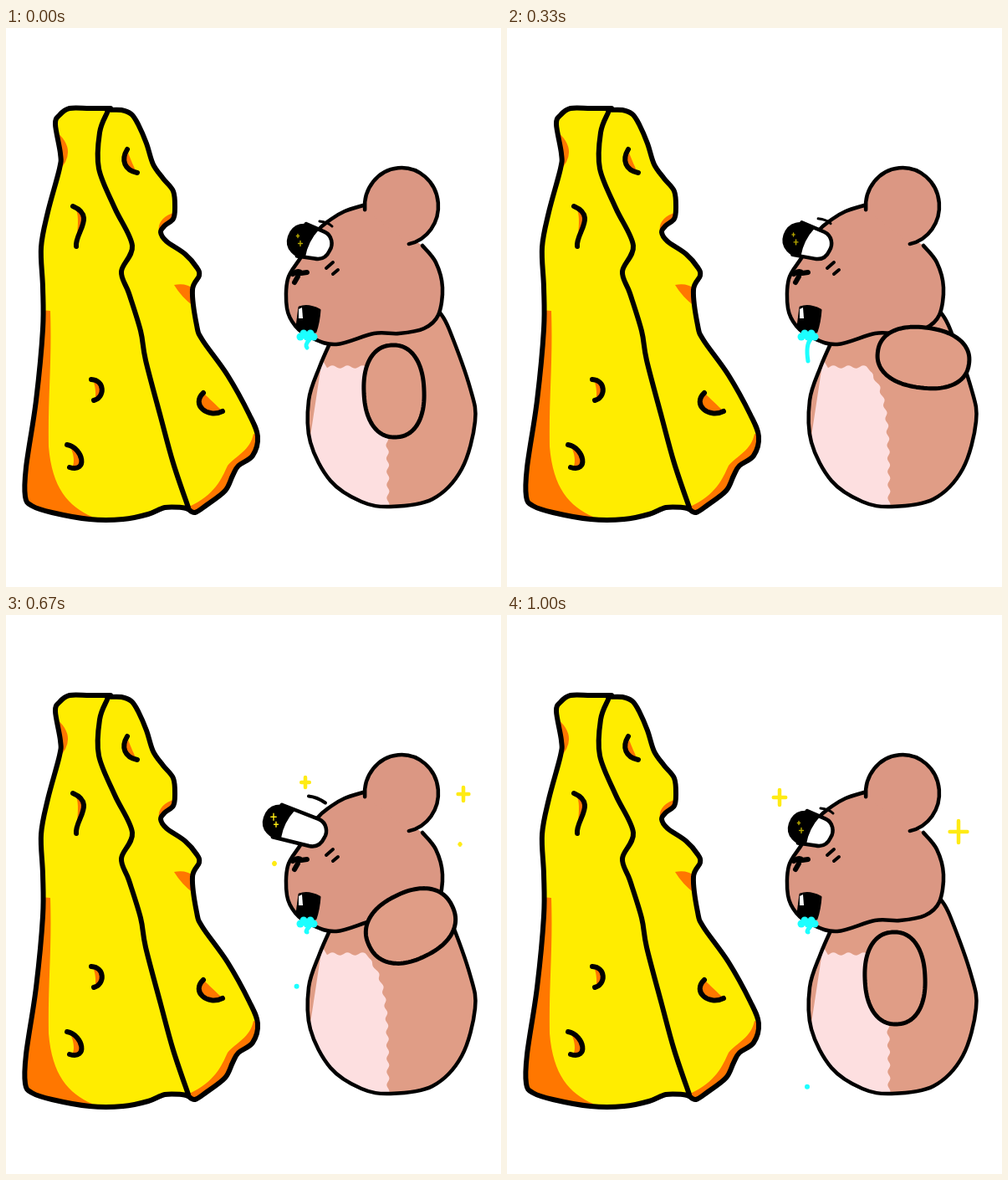
Animation, 592 px wide and 668 px high, one loop 1.08 s. Source, as an HTML page with a canvas:

```html
<!DOCTYPE html>
<html lang="en">
<head>
<meta charset="utf-8">
<title>Hungry bear</title>
<style>
html, body { margin: 0; width: 592px; height: 668px; overflow: hidden; background: #fff; }
canvas { display: block; }
</style>
</head>
<body>
<canvas id="stage" width="592" height="668"></canvas>
<script>
const ctx = document.getElementById('stage').getContext('2d');
const LOOP = 1080, FPS = 24;
const INK = '#000', CHEESE = '#ffed00', ORANGE = '#ff7700';
const BODY = '#e09d86', HEAD = '#db9783', BELLY = '#fddfe0', DROOL = '#1cffff', GOLD = '#ffeb14';

// Smooth curve through points given as "x,y x,y ..."
function curve(text, closed) {
  const p = text.split(' ').map(s => s.split(',').map(Number));
  const n = p.length;
  const at = i => closed ? p[(i + n) % n] : p[Math.max(0, Math.min(n - 1, i))];
  const path = new Path2D();
  path.moveTo(...p[0]);
  for (let i = 0; i < (closed ? n : n - 1); i++) {
    const [a, b, c, d] = [at(i - 1), at(i), at(i + 1), at(i + 2)];
    path.bezierCurveTo(b[0] + (c[0] - a[0]) / 6, b[1] + (c[1] - a[1]) / 6,
      c[0] - (d[0] - b[0]) / 6, c[1] - (d[1] - b[1]) / 6, ...c);
  }
  return path;
}
const svg = d => new Path2D(d);

function fill(path, color) {
  ctx.fillStyle = color;
  ctx.fill(path);
}
function line(path, width, color = INK) {
  ctx.strokeStyle = color;
  ctx.lineWidth = width;
  ctx.stroke(path);
}
function dot(x, y, r, color) {
  const path = new Path2D();
  path.arc(x, y, r, 0, Math.PI * 2);
  fill(path, color);
}
function plus(x, y, r, width, color = GOLD) {
  line(svg(`M${x - r * .8},${y}h${r * 1.6}M${x},${y - r}v${r * 2}`), width, color);
}
function clipped(path, paint) {
  ctx.save();
  ctx.clip(path);
  paint();
  ctx.restore();
}

// Cheese
const leftEdge = '125,96 100,96 76,96 64,104 59,115 65,150 64,168 50,220 42,262 44,310 44,360 36,445 24,525 23,560 31,571 55,579 100,587 140,587 170,581 190,573 210,573 218,575';
const rightEdge = '218,575 226,579 240,570 262,553 271,535 278,523 295,511 301,488 291,462 265,415 235,373 228,355 223,313 231,296 228,286 214,270 192,255 185,244 190,236 200,228 202,215 200,195 188,180 176,163 168,138 158,115 150,103 138,98 121,98';
const block = curve(leftEdge + ' ' + rightEdge, true);
const edges = [leftEdge, rightEdge,
  '121,101 112,125 111,168 130,215 151,260 138,291 147,317 161,362 167,397 185,465 200,520 218,573'
].map(s => curve(s));
const shade = svg(`M20,335L53,338C55,400 50,440 51,500C55,550 75,572 103,584L20,600Z
  M219,572C250,558 258,538 265,523C275,511 292,505 296,485L310,490V600H219Z
  M58,122Q88,146 62,172Z M203,220C185,225 180,236 184,246L205,236Z
  M201,307Q215,304 225,312V333Q210,322 201,307Z`);

// A hole is a bent stroke; depth tells how far its shadow reaches to the chord
function hole(a, b, c, d, depth) {
  const mix = (p, q) => p.map((v, i) => v + (q[i] - v) * depth);
  fill(svg(`M${a}C${b} ${c} ${d}C${mix(c, d)} ${mix(b, a)} ${a}`), ORANGE);
  line(svg(`M${a}C${b} ${c} ${d}`), 6);
}

function drawCheese() {
  fill(block, CHEESE);
  clipped(block, () => fill(shade, ORANGE));
  edges.forEach(e => line(e, 6));
  hole([145, 145], [137, 158], [142, 170], [157, 173], .9);
  hole([80, 213], [108, 225], [82, 245], [84, 261], .6);
  hole([102, 420], [118, 421], [119, 441], [105, 445], .7);
  hole([73, 498], [93, 502], [98, 532], [76, 525], .6);
  hole([236, 436], [221, 450], [241, 467], [259, 458], 1);
}

// Bear
const body = curve('389,373 375,405 362,445 364,495 388,541 425,566 460,572 510,563 545,527 561,470 555,430 530,360 519,340');
const head = curve('427,212 405,219 388,229 372,243 352,275 337,300 336,335 346,356 365,370 395,378 440,365 470,365 500,359 517,343 522,310 514,280 498,260');
const ear = new Path2D();
ear.ellipse(473, 213, 44, 46, 0, 3.05, 1.37 + Math.PI * 2);

// Frayed edges of the belly patch
const belly = new Path2D('M350,580');
belly.lineTo(378, 396);
for (let x = 384; x < 432; x += 2) belly.lineTo(x, 405 + 1.8 * Math.sin(x * .35));
for (let y = 410; y < 580; y += 2) {
  belly.lineTo(457 - 22 * Math.exp((412 - y) / 28) + 1.6 * Math.sin(y * .4), y);
}

function drawBear() {
  fill(body, BODY);
  clipped(body, () => fill(belly, BELLY));
  line(body, 4.5);
  fill(head, HEAD);
  line(head, 4.5);
  fill(ear, HEAD);
  line(ear, 4.5);

  line(svg('M343,294Q350,289 353,293L360,292M345,304L349,297'), 6);
  line(svg('M383,287L391,280M391,294L397,289'), 4);
  const mouth = svg('M351,334Q361,330 375,337Q374,352 370,363Q357,366 348,357Z');
  fill(mouth, INK);
  line(mouth, 3);
  fill(svg('M350,336L354,334L355,347H350Z'), '#fff');
}

// The eye pops out over three drawings, a little differently each time
function drawEye(k) {
  const reach = [21, 17, 29, 24, 0][Math.floor(k / 3)];
  const out = reach * Math.pow(k % 3 / 2, 1.4);
  const far = k % 3 === 2;
  const x = 354 - out, y = 254.5 - out * .25;
  const len = 35 + out * .82;

  ctx.save();
  ctx.translate(x, y);
  ctx.rotate(.33);
  const tube = svg(`M-2,-21L${len - 13},-19C${len - 3},-18 ${len + 2},-8 ${len},0C${len - 1},10 ${len - 6},14 ${len - 14},15L0,19Z`);
  const pupil = svg('M14,-20Q6,-2 9,17C0,22 -17,16 -17,0C-17,-16 -4,-24 14,-20Z');
  fill(tube, '#fff');
  line(tube, 4.5);
  fill(pupil, INK);
  line(pupil, 2);
  ctx.restore();

  const glint = far ? GOLD : '#b5a600';
  plus(x - 5, y - 6, far ? 4 : 2, 1.4, glint);
  plus(x - 2, y + 3, 3, 1.4, glint);

  const lx = 375 - out * .45, ly = 231 - out * .5;
  line(svg(`M${lx},${ly}q10,1 ${far ? '20,8' : '15,6'}`), far ? 4 : 3);
}

// A strand grows, lets go, and the drop falls in a slow sway
function drawDrool(k) {
  for (let i = 0; i < 5; i++) dot(352 + i * 4, 367 + (i % 2 ? -1 : 1) * 2, 4.5, DROOL);
  const loose = k - 5;
  const tip = loose < 0 ? 384 + k * 4 : 381;
  line(svg(`M363,372Q357,379 360,${tip - 2}`), 5, DROOL);
  if (loose >= 0) {
    dot(353 + 6 * Math.cos(loose / 7 * Math.PI * 2), 400 + 8 * loose + 2.2 * loose ** 2, 3, DROOL);
  }
}

// Arm: a slightly squared oval, turned about its middle
const poses = {
  down: { x: 464, y: 434, turn: 1.53, w: 36 },
  mid: { x: 498, y: 394, turn: .13, w: 36 },
  up: { x: 484, y: 371.5, turn: -.45, w: 40 }
};
function drawArm(n) {
  const beat = Math.floor(n / 3);
  const pose = poses[beat % 8 === 0 ? 'down' : beat % 2 ? 'up' : 'mid'];
  const squared = v => Math.sign(v) * Math.abs(v) ** .88;
  const path = new Path2D();
  for (let a = 0; a < Math.PI * 2; a += .06) {
    path.lineTo(55 * squared(Math.cos(a)), pose.w * squared(Math.sin(a)));
  }
  path.closePath();
  ctx.save();
  ctx.translate(pose.x, pose.y);
  ctx.rotate(pose.turn);
  fill(path, BODY);
  line(path, 5);
  ctx.restore();
}

// Sparkles: step of full size, x, y, size; one step later only a speck is left
const sparkles = [
  [6, 554, 255, 3], [7, 543, 274, 6], [8, 358, 200, 6], [8, 547, 214, 8], [8, 321, 297, 1],
  [10, 377, 206, 8], [10, 560, 316, 9], [12, 326, 218, 9], [12, 540, 259, 13]
];
function drawSparkles(k) {
  for (const [peak, x, y, size] of sparkles) {
    if (k === peak) plus(x, y, size, 4.5);
    if (k === peak + 1) plus(x, y, 1, 4);
  }
}

function draw(t) {
  // Drawing starts are rounded to 10 ms
  let n = 0;
  while (n < 25 && Math.round((n + 1) * 100 / FPS) * 10 <= t) n++;
  const k = Math.floor(n / 2);

  ctx.fillStyle = '#fff';
  ctx.fillRect(0, 0, 592, 668);
  drawCheese();
  drawBear();
  drawEye(k);
  drawDrool(k);
  drawArm(n);
  drawSparkles(k);
}

ctx.lineCap = ctx.lineJoin = 'round';
const start = performance.now();
function tick() {
  draw((performance.now() - start) % LOOP);
  requestAnimationFrame(tick);
}
tick();
</script>
</body>
</html>
```
